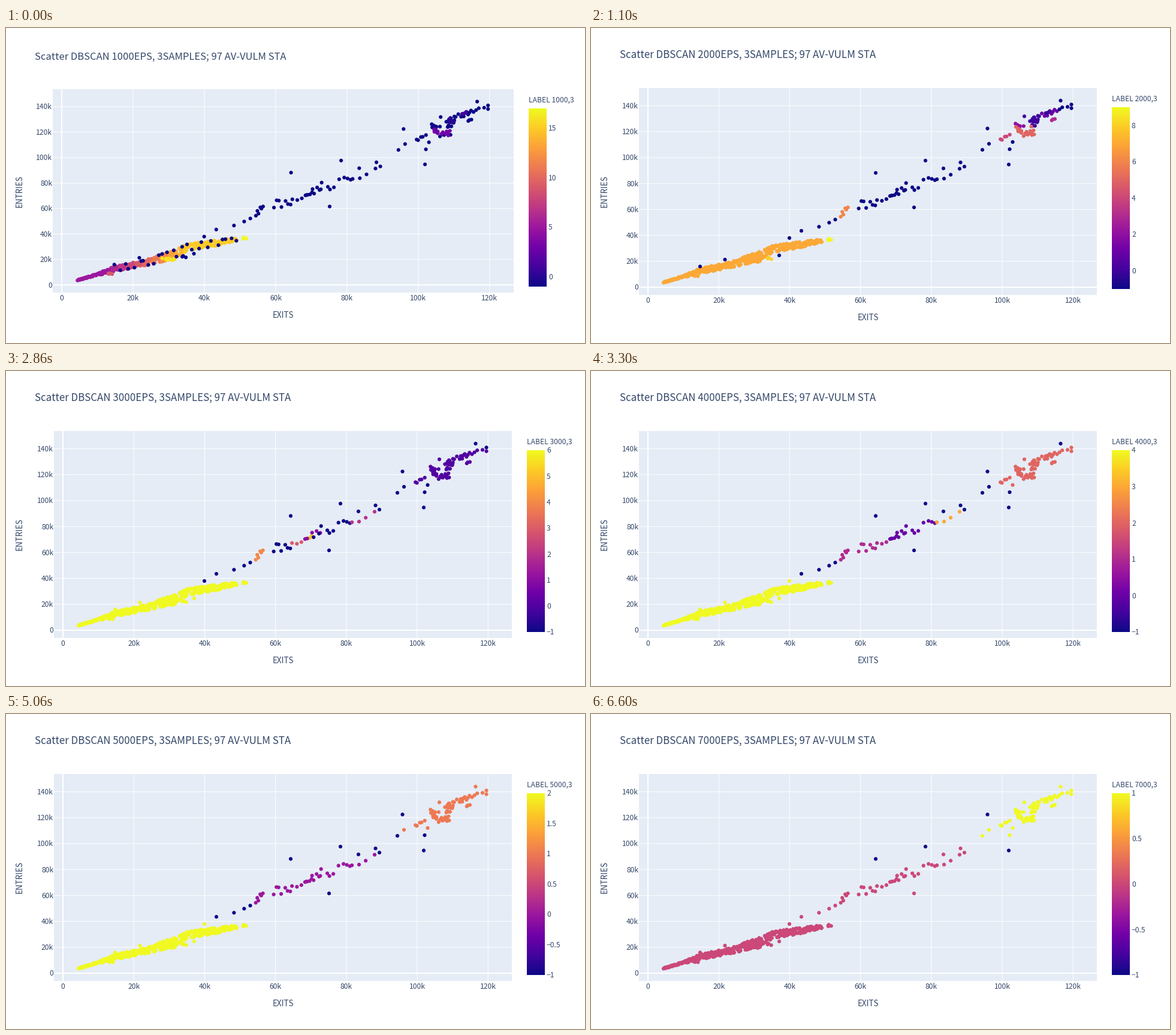
Animation of 966 by 525 pixels, one loop 7.7 s. Source, as a matplotlib script:

```python
import numpy as np
import matplotlib.pyplot as plt
from matplotlib.animation import FuncAnimation
from matplotlib.colors import LinearSegmentedColormap
from matplotlib.patches import Rectangle

W, H, DPI = 966, 525, 64
PT = 72 / DPI  # points per pixel
INK = "#35486a"
PANEL = "#e5ecf6"
FONT = "Noto Sans CJK JP"
STATION = "97 AV-VULM STA"
PLASMA = LinearSegmentedColormap.from_list("plasma10", [
    "#0d0887", "#46039f", "#7201a8", "#9c179e", "#bd3786",
    "#d8576b", "#ed7953", "#fb9f3a", "#fdca26", "#f0f921"])

# Highest cluster label for eps = 1000, 2000, ...
TOP_LABEL = [17, 9, 6, 4, 2, 2, 1]

# Plot areas as left, top, right, bottom; the opening view is slightly flatter
BASE = (80, 100, 844, 445)
OPENING = (78, 102, 847, 441)

# Key points of the two trends: the dense low band and the sparse upper line
LOW = [(121, 424), (150, 415.5), (185, 404), (232, 395), (265, 385),
       (285, 378), (305, 367.5), (345, 362), (384, 354.5)]
LOW_SPREAD = [0.7, 1.5, 4.5, 4.5, 7, 6, 5.5, 5, 2.5]
HIGH = [(381, 331), (408, 319), (425, 303), (460, 294), (500, 281), (550, 258),
        (600, 246), (690, 182), (725, 161), (765, 140), (801, 131)]

# Isolated points, keyed by their labels from eps 2000 on ("-" is noise)
ISOLATED = {
    "------": [(475, 241.5), (558, 221), (661.5, 167.5), (697, 227.5)],
    "-----0": [(351, 338), (539, 299)],
    "----00": [(588, 234), (616.5, 224), (623, 231)],
    "----11": [(653, 203), (698.5, 202)],
    "---111": [(664, 193), (783.5, 121)],
    "--2111": [(703.5, 190), (801.5, 127.5)],
    "--4220": [(331, 350)],
    "-64220": [(182, 397.5), (223.5, 386), (314, 379)],
}

rng = np.random.default_rng(12)
groups = []


def add(xy, first, later):
    """Store points with their label at eps 1000 and one digit per later eps."""
    rows = np.empty((len(xy), 9))
    rows[:, :2] = xy
    rows[:, 2] = first
    rows[:, 3:] = [-1 if c == "-" else int(c) for c in later]
    groups.append(rows)


def trend(curve, x):
    return np.interp(x, *np.transpose(curve))


def along(n, x0, x1, spread):
    """Points at loose steps along the upper line."""
    step = (x1 - x0) / max(n - 1, 1)
    x = np.linspace(x0, x1, n) + rng.uniform(-0.3, 0.3, n) * step
    return np.column_stack([x, trend(HIGH, x) + rng.uniform(-1, 1, n) * spread])


def blob(n, cx, cy, sx, sy):
    return (cx, cy) + np.clip(rng.normal(size=(n, 2)), -1.8, 1.8) * (sx, sy)


def low_band():
    """Dense band whose first labels climb from left to right."""
    x = np.linspace(121.5, 384, 350) + rng.uniform(-1, 1, 350)
    spread = np.interp(x, [p[0] for p in LOW], LOW_SPREAD)
    y = trend(LOW, x) + rng.uniform(-1, 1, x.size) * spread
    climb = np.clip((x - 170) / 135, 0, 1)
    add(np.column_stack([x, y]), 5 + np.round(10 * climb), "764220")
    add(blob(16, 271, 388.5, 6, 1.2), 16, "764220")
    add(blob(4, 173, 412.5, 3, 1.2), 9, "764220")

    x = np.linspace(192, 384, 25) + rng.uniform(-3, 3, 25)
    side = rng.choice([-1, 1], x.size)
    spread = np.interp(x, [p[0] for p in LOW], LOW_SPREAD)
    add(np.column_stack([x, trend(LOW, x) + side * spread]), -1, "764220")
    add(blob(3, 301, 384, 4, 1.5), -1, "864220")
    add(blob(4, 398, 352.5, 1.5, 1.5), 17, "964220")


def middle():
    add(along(3, 381, 407.5, 1), -1, "----00")
    add(along(6, 416, 429, 5), -1, "641000")
    add(along(7, 446, 474, 8), -1, "--1000")
    add(along(3, 475, 491, 4), -1, "-31000")
    add(along(3, 501, 510, 2), -1, "-50000")
    add(along(5, 497, 526, 7), -1, "-10000")
    add(along(10, 514, 575, 12), -1, "--0000")
    add(along(4, 580, 614, 3), -1, "-23000")


def upper_cloud():
    add(along(5, 682, 698, 2), -1, "402111")
    add(blob(5, 711, 162, 6, 3), -1, "202111")
    add(blob(12, 741, 154, 12, 5), -1, "002111")
    add(blob(10, 741, 152, 3, 2.5), 0, "002111")
    add(blob(8, 727, 172, 10, 4.5), -1, "502111")
    add(blob(17, 727, 173, 10, 3), 3, "502111")
    add(along(9, 753, 777, 5), -1, "102111")
    add(blob(4, 763, 141, 2.5, 1), 1, "002111")
    add(blob(3, 769, 152.5, 3, 1), -1, "302111")
    add(along(4, 782, 800, 3), -1, "-02111")


low_band()
middle()
upper_cloud()
for later, xy in ISOLATED.items():
    add(xy, -1, later)
DOTS = np.vstack(groups)

fig = plt.figure(figsize=(W / DPI, H / DPI), dpi=DPI, facecolor="white")
ax = fig.add_axes([0, 0, 1, 1])


def fit(x, y, panel):
    """Move a place in the base plot area to the given one."""
    l, t, r, b = BASE
    x0, y0, x1, y1 = panel
    return x0 + (x - l) * (x1 - x0) / (r - l), y1 + (y - b) * (y1 - y0) / (b - t)


def text(x, y, s, px, ha="left", **kw):
    ax.text(x, y, s, fontsize=px * PT, ha=ha, va="baseline",
            color=INK, family=FONT, **kw)


def line(xs, ys, width):
    ax.plot(xs, ys, color="white", lw=width * PT, zorder=1,
            solid_capstyle="butt", snap=False)


def draw_panel(panel):
    x0, y0, x1, y1 = panel
    ax.add_patch(Rectangle((x0, y0), x1 - x0, y1 - y0, fc=PANEL, ec="none", zorder=0))
    for v in range(0, 141, 20):
        x, y = fit(95 + 5.91 * v, 432 - 2.16 * v, panel)
        name, width = (f"{v}k", 1) if v else ("0", 2)
        if v <= 120:
            line([x, x], [y0, y1], width)
            text(x, y1 + 13.2, name, 12.1, "center")
        line([x0, x1], [y, y], width)
        text(x0 - 0.8, y + 4.4, name, 12.1, "right")
    text((x0 + x1) / 2, y1 + 42, "EXITS", 13.4, "center")
    text(27, 272, "ENTRIES", 13.4, "center", rotation=90, rotation_mode="anchor")


def draw_bar(panel, top):
    x, y0, y1 = panel[2] + 25, panel[1] + 32, panel[3] - 10
    ax.imshow(np.linspace(1, 0, 256)[:, None], cmap=PLASMA, vmin=0, vmax=1,
              aspect="auto", extent=(x, x + 30, y1, y0), zorder=2)
    step = next(s for s in (0.5, 1, 2, 5) if (top + 1) / s < 8)
    for v in np.arange(np.ceil(-1 / step) * step, top + 0.01, step):
        y = y1 - (v + 1) / (top + 1) * (y1 - y0)
        text(x + 33, y + 4.4, f"{v + 0.0:g}".replace("-", "\u2212"), 12.1)


def draw(i):
    panel, title_y, title_size = (BASE, 50, 16.9) if i else (OPENING, 53, 16.6)
    eps, top = 1000 * (i + 1), TOP_LABEL[i]
    ax.clear()
    ax.axis("off")
    draw_panel(panel)
    draw_bar(panel, top)
    text(48.5, title_y, f"Scatter DBSCAN {eps}EPS, 3SAMPLES; {STATION}", title_size)
    text(panel[2] + 25, panel[1] + 22, f"LABEL {eps},3", 12.1)
    x, y = fit(DOTS[:, 0], DOTS[:, 1], panel)
    ax.scatter(x, y, s=(6.2 * PT) ** 2, c=DOTS[:, 2 + i], cmap=PLASMA,
               vmin=-1, vmax=top, linewidths=0, zorder=3)
    ax.set_xlim(0, W)
    ax.set_ylim(H, 0)
    return []


anim = FuncAnimation(fig, draw, frames=7, interval=1100, repeat=True)
plt.show()
```
